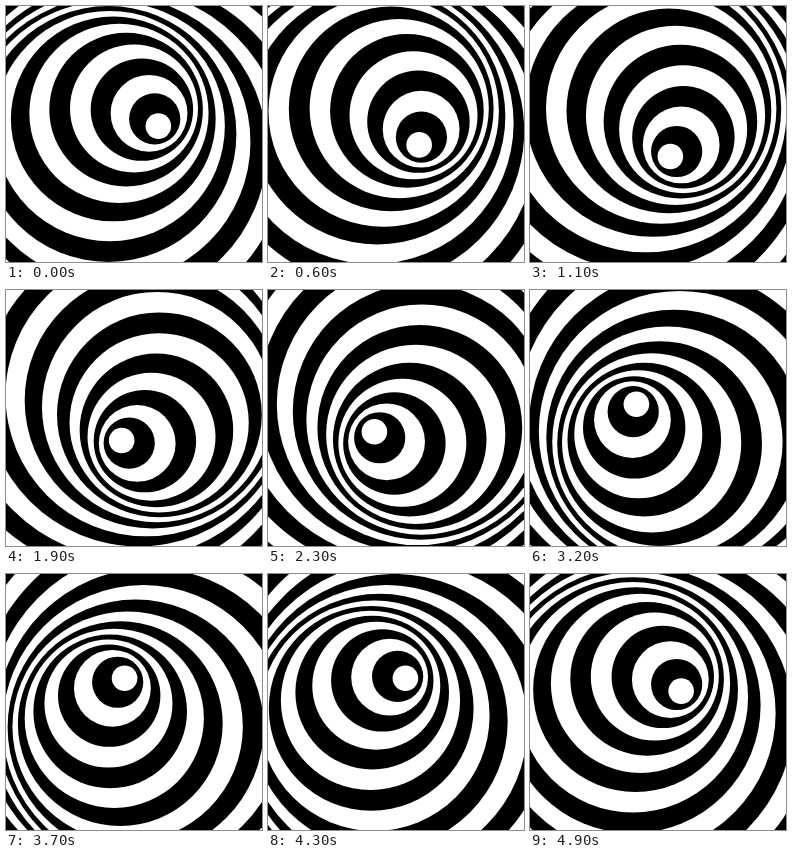
Recreate the animation shown at these times as an HTML page. Size 256x256 px, loop 5000 ms.

```html
<!DOCTYPE html>
<html lang="en">
<head>
<meta charset="utf-8">
<title>Swirling rings</title>
<style>
  html, body { margin: 0; width: 100%; height: 100%; overflow: hidden; background: #fff; }
  svg { display: block; width: 100vw; height: 100vh; }
</style>
</head>
<body>
<svg id="stage" viewBox="0 0 256 256"></svg>
<script>
  const LOOP = 5000, STEP = 100;
  const CENTER = 128, ORBIT = 25.6, GROWTH = 12.8, RINGS = 17;
  const LAG = Math.PI / 10;

  const stage = document.getElementById('stage');
  const rings = [];

  // Largest disc first, so each smaller one covers its middle.
  for (let k = RINGS; k >= 1; k--) {
    const disc = document.createElementNS('http://www.w3.org/2000/svg', 'circle');
    disc.setAttribute('r', k * GROWTH);
    disc.setAttribute('fill', k % 2 ? '#fff' : '#000');
    stage.appendChild(disc);
    rings.push({ k, disc });
  }

  // Every disc circles the middle, each one trailing the next smaller.
  function draw(ms) {
    const time = Math.floor((ms % LOOP) / STEP) * STEP;
    const turn = time / LOOP * 2 * Math.PI;
    for (const { k, disc } of rings) {
      const angle = turn - k * LAG;
      disc.setAttribute('cx', CENTER + ORBIT * Math.cos(angle));
      disc.setAttribute('cy', CENTER + ORBIT * Math.sin(angle));
    }
  }

  let start;
  function tick(now) {
    if (start === undefined) start = now;
    draw(Math.max(0, now - start));
    requestAnimationFrame(tick);
  }

  draw(0);
  requestAnimationFrame(tick);
</script>
</body>
</html>
```
